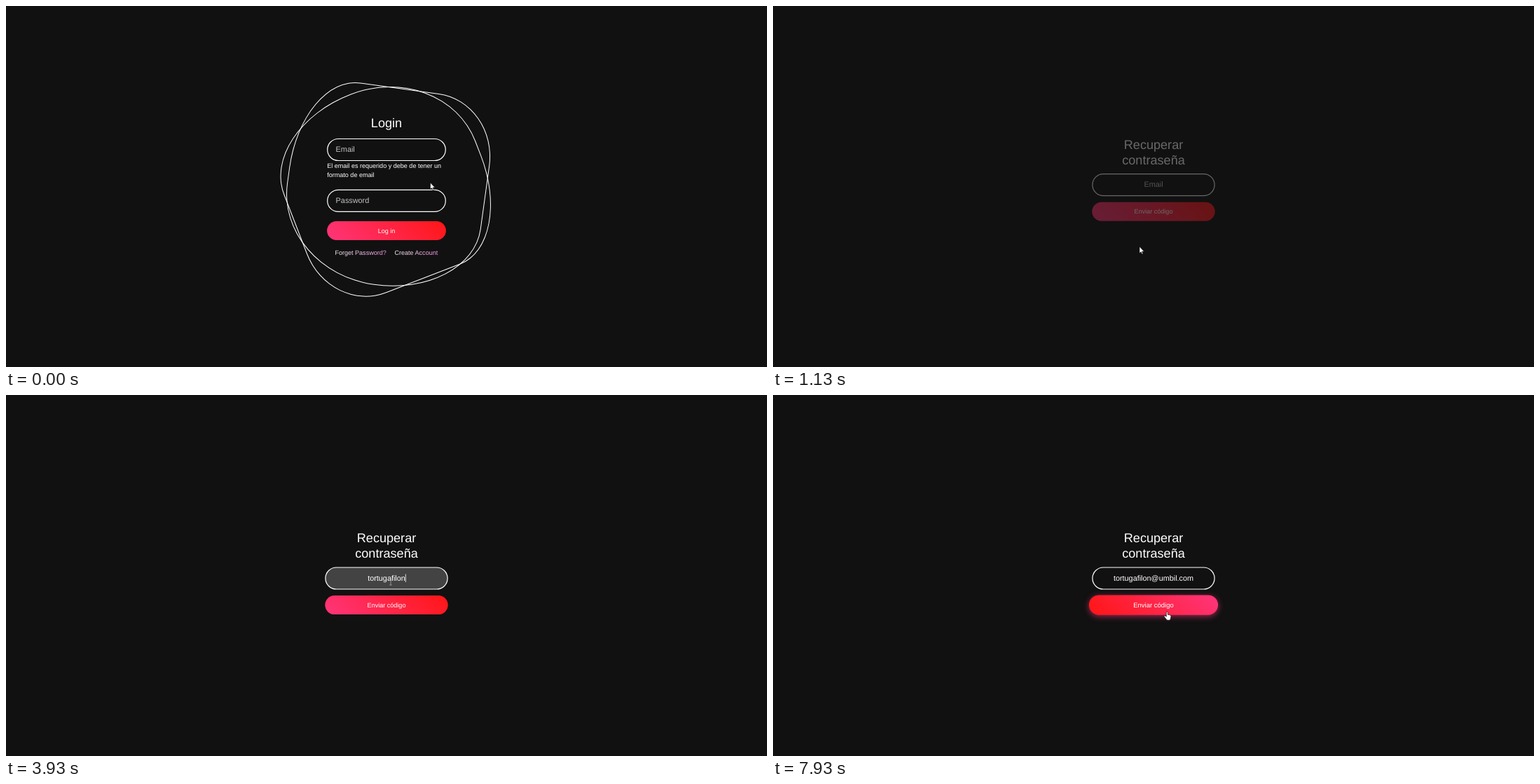
An HTML page that plays this animation: 1086x515 px, repeating every 8 s.

```html
<!DOCTYPE html>
<html lang="es">
<head>
<meta charset="utf-8">
<title>Login</title>
<style>
  html, body { margin: 0; width: 100%; height: 100%; overflow: hidden; background: #111; }
  #stage { position: relative; width: 1086px; height: 515px; overflow: hidden; background: #111; }
  .ring {
    position: absolute; left: 401.6px; top: 116.1px; width: 282.8px; height: 282.8px;
    box-sizing: border-box; border: 1.13px solid #fff;
    border-radius: 41% 44% 56% 59% / 38% 62% 63% 37%;
  }
  svg { position: absolute; inset: 0; }
  text {
    font: 9.05px "Liberation Sans", Arial, sans-serif; fill: #fff;
    text-rendering: geometricPrecision; white-space: pre;
  }
  .title { font-size: 18.1px; }
  .field { font-size: 10.86px; }
  .hint { fill: rgba(255, 255, 255, .75); }
  .mid { text-anchor: middle; }
  .input { fill: transparent; stroke: #fff; stroke-width: 1.2; }
  #cursors path { fill: #fff; stroke: #000; stroke-width: .6; stroke-linejoin: round; }
  #cursors .beam { fill: none; stroke: #aaa; stroke-width: .8; }
</style>
</head>
<body>
<div id="stage">
  <div class="ring"></div>
  <div class="ring"></div>
  <svg width="1086" height="515" viewBox="0 0 1086 515">
    <defs>
      <linearGradient id="warm" gradientUnits="userSpaceOnUse" x1="-49" y1="49" x2="49" y2="-49">
        <stop stop-color="#ff357a"/><stop offset="1" stop-color="#ff1616"/>
      </linearGradient>
      <linearGradient id="warmFlipped" gradientUnits="userSpaceOnUse" x1="-49" y1="49" x2="49" y2="-49">
        <stop stop-color="#ff1616"/><stop offset="1" stop-color="#ff357a"/>
      </linearGradient>
      <linearGradient id="forgetInk" gradientUnits="userSpaceOnUse" x1="396" x2="543">
        <stop stop-color="#ff00bb"/><stop offset=".5" stop-color="#ff00bb"/>
        <stop offset=".5" stop-color="#eee"/><stop offset="1" stop-color="#f28fe0"/>
      </linearGradient>
      <linearGradient id="createInk" gradientUnits="userSpaceOnUse" x1="554.3" x2="616.7">
        <stop stop-color="#eee"/><stop offset="1" stop-color="#f28fe0"/>
      </linearGradient>
    </defs>

    <g id="login">
      <text class="title mid" x="543" y="173">Login</text>
      <rect class="input" x="458.7" y="189.5" width="168.6" height="31" rx="15.5"/>
      <text class="field hint" x="470.6" y="208.3">Email</text>
      <text x="458.2" y="230.5">El email es requerido y debe de tener un</text>
      <text x="458.2" y="244.1">formato de email</text>
      <rect class="input" x="458.7" y="262.4" width="168.6" height="31" rx="15.5"/>
      <text class="field hint" x="470.6" y="281.1">Password</text>
      <g id="loginButton">
        <rect x="-84.9" y="-13.5" width="169.8" height="27" rx="13.5"/>
        <text class="mid" y="3.1">Log in</text>
      </g>
      <text x="469.4" y="355" style="fill:url(#forgetInk)">Forget Password?</text>
      <text x="554.4" y="355" style="fill:url(#createInk)">Create Account</text>
    </g>

    <g id="recover">
      <text class="title mid" x="543" y="210.3">Recuperar</text>
      <text class="title mid" x="543" y="232.1">contraseña</text>
      <rect class="input" id="emailBox" x="455.9" y="246" width="174.2" height="31" rx="15.5"/>
      <text class="field hint mid" id="hint" x="543" y="264.8">Email</text>
      <text class="field mid" id="typed" x="543" y="264.8"></text>
      <rect id="caret" y="255.5" width=".8" height="11.5" fill="#fff"/>
      <g id="sendButton">
        <rect x="-87.7" y="-13.5" width="175.4" height="27" rx="13.5"/>
        <text class="mid" y="3.1">Enviar código</text>
      </g>
    </g>

    <g id="cursors">
      <path id="arrow" d="M0 0V9.6L2.2 7.6 3.6 10.9 5.1 10.3 3.7 7H6.7Z"/>
      <path id="hand" d="M-1 1a1 1 0 0 1 2 0V4l3.6.8q1.3.4 1.1 1.9L5 10.3q-.3 1.7-1.6 1.7H.8q-1 0-1.6-.9L-4 7q-.5-1.100.5-1.400 1.100 0 2.500 1.400Z"/>
      <path id="beam" class="beam" d="M-1.700-4.300H1.700M0-4.300V4.300M-1.700 4.300H1.700"/>
    </g>
  </svg>
</div>

<script>
const LOOP = 8000;
const SWITCH = 1000;   // login gives way to the recovery form
const FOCUS = 2130;
const BLUR = 7530;
const EMAIL = 'tortugafilon@umbil.com';

// [time, characters typed]
const KEYS = [
  [FOCUS, 0], [2600, 1], [2800, 2], [2930, 3], [3130, 4], [3270, 5], [3330, 6],
  [3530, 7], [3600, 8], [3730, 9], [3800, 10], [3930, 12], [4800, 13],
  [5530, 14], [5600, 15], [5800, 17], [6130, 18], [6330, 19],
  [6470, 20], [6530, 21], [6600, 22]
];

// [time, x, y]
const PATH = [
  [0, 605.5, 252], [70, 605.5, 252], [480, 575, 307], [690, 545, 336],
  [830, 530.5, 349], [1050, 530.5, 349], [1400, 498, 324], [1530, 493.5, 319.5],
  [1600, 502, 308], [1730, 530, 277], [1800, 541, 268], [2000, 549, 266.8],
  [7100, 549, 266.8], [7300, 556, 292], [7430, 561, 313], [7600, 562, 314],
  [7900, 562.3, 309.2], [8000, 562.3, 309.2]
];

const $ = id => document.getElementById(id);
const rings = document.querySelectorAll('.ring');
const clamp = p => Math.max(0, Math.min(1, p));
const ease = p => 1 - (1 - p) ** 2.2;
const ramp = (t, start, duration) => ease(clamp((t - start) / duration));
const smooth = p => p * p * (3 - 2 * p);
const show = (el, on) => { el.style.display = on ? '' : 'none'; };

function pointer(t) {
  const i = Math.max(1, PATH.findIndex(p => p[0] > t));
  const [t0, x0, y0] = PATH[i - 1], [t1, x1, y1] = PATH[i];
  const p = (t - t0) / (t1 - t0);
  return [x0 + (x1 - x0) * p, y0 + (y1 - y0) * p];
}

function drawRings(t) {
  const k = ramp(t, 70, 500);
  const angles = [97.8 + t * .09, 248.9 - t * .036];
  rings.forEach((ring, i) => {
    show(ring, t < SWITCH);
    ring.style.transform = `rotate(${angles[i]}deg)`;
    ring.style.borderWidth = `${1.13 + 2.27 * k}px`;
    ring.style.borderColor = `rgb(255,${255 * (1 - k)},${255 - 68 * k})`;
    ring.style.filter = k ? `drop-shadow(0 0 ${11.3 * k}px rgba(255,0,187,${k}))` : 'none';
  });
}

function drawButton(button, y, k, hovered) {
  button.setAttribute('transform', `translate(543 ${y}) scale(${1 + .05 * k})`);
  const face = button.firstElementChild;
  face.setAttribute('fill', `url(#${hovered ? 'warmFlipped' : 'warm'})`);
  face.style.filter = k ? `drop-shadow(0 2.5px 4px rgba(255,53,122,${.6 * k}))` : 'none';
}

function drawLogin(t) {
  show($('login'), t < SWITCH);
  const k = Math.min(ramp(t, 480, 300), 1 - ramp(t, 680, 300));
  drawButton($('loginButton'), 320.5, k, t >= 480 && t < 680);
  const sweep = smooth(clamp((t - 810) / 300));
  $('forgetInk').setAttribute('gradientTransform', `translate(${73.5 * sweep} 0)`);
}

function drawRecover(t) {
  const k = ramp(t, SWITCH, 700);
  show($('recover'), t >= SWITCH);
  $('recover').setAttribute('opacity', k);
  $('recover').setAttribute('transform', `translate(0 ${-10 * (1 - k)})`);

  const lit = ramp(t, 1850, 350) - ramp(t, BLUR, 350);
  $('emailBox').style.fill = `rgba(255,255,255,${.21 * lit})`;

  const [keyTime, count] = KEYS.filter(key => key[0] <= t).pop() || [-LOOP, 0];
  $('typed').textContent = EMAIL.slice(0, count);
  show($('hint'), !count);
  show($('caret'), t - keyTime < 530);
  $('caret').setAttribute('x', 543 + (count ? $('typed').getComputedTextLength() / 2 : 0));

  drawButton($('sendButton'), 299.6, ramp(t, 7360, 300), t >= 7360);
}

function drawCursor(t) {
  const [x, y] = pointer(t);
  const overLink = t >= 810 && t < SWITCH + 50;
  const overButton = (t >= 480 && t < 680) || t >= 7360;
  const overInput = (t >= 150 && t < 390) || (t >= 1730 && t < 7180);
  const kind = overLink || overButton ? 'hand' : overInput ? 'beam' : 'arrow';
  for (const id of ['arrow', 'hand', 'beam']) show($(id), id === kind);
  $('cursors').setAttribute('transform', `translate(${x} ${y})`);
}

function frame() {
  const t = performance.now() % LOOP;
  drawRings(t);
  drawLogin(t);
  drawRecover(t);
  drawCursor(t);
  requestAnimationFrame(frame);
}
frame();
</script>
</body>
</html>
```
